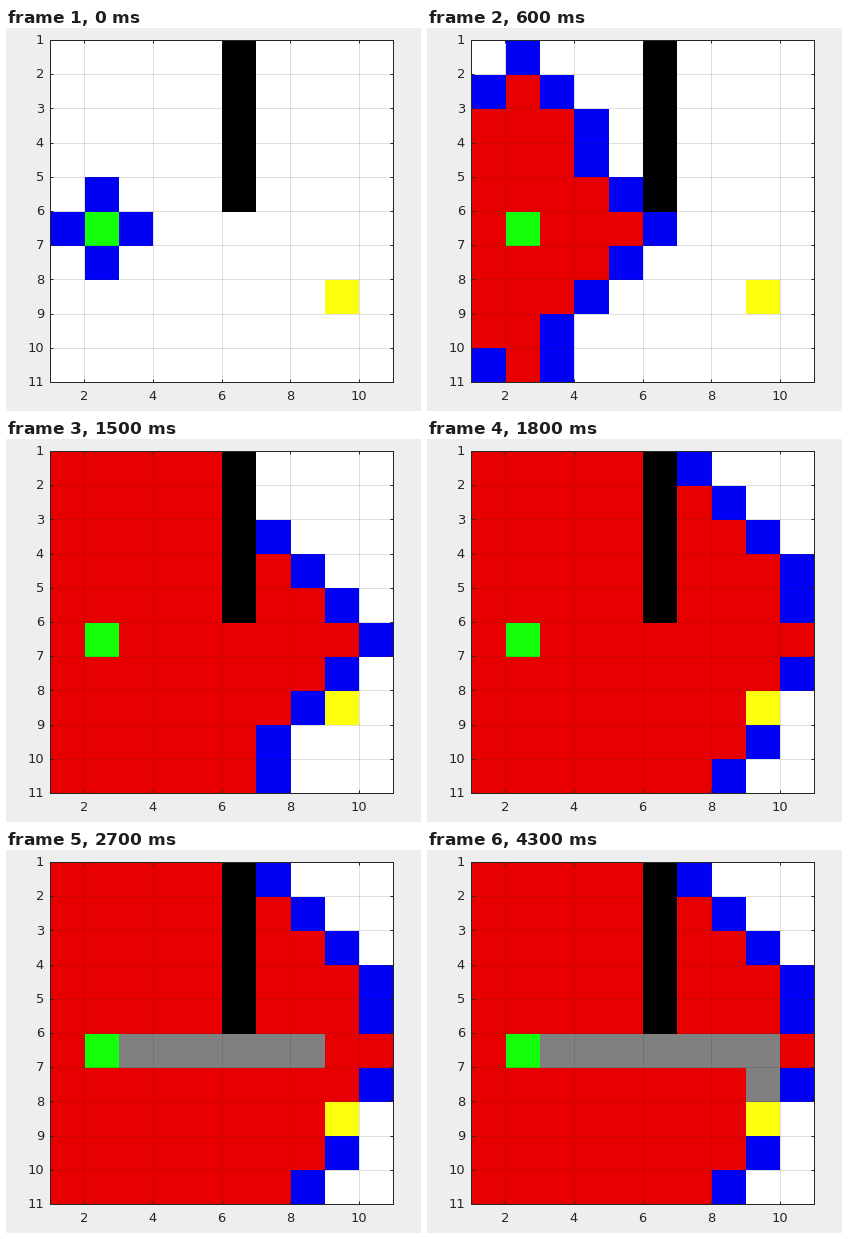
A matplotlib script that plays this animation: 415x383 px, repeating every 4400 ms.

```python
import numpy as np
import matplotlib.pyplot as plt
from matplotlib.animation import FuncAnimation
from matplotlib.colors import ListedColormap

W, H, DPI = 415, 383, 100
LEFT, RIGHT, TOP, BOTTOM = 44.05, 387.05, 12.05, 354.05
INK = "#262626"

FRAMES, INTERVAL = 44, 100
EXPANSIONS_PER_FRAME = 4.2
PATH_START, PATH_STEP = 2000, 140  # ms

N = 10
START, GOAL = (5, 1), (7, 8)  # (row, column), zero based
FREE, WALL, CLOSED, OPEN, BEGIN, END, PATH = range(7)
COLORS = ["#ffffff", "#000000", "#e80000", "#0000f5",
          "#14ff0a", "#fbff0c", "#808080"]


def make_grid():
    grid = np.full((N, N), FREE)
    grid[:5, 5] = WALL
    grid[START], grid[GOAL] = BEGIN, END
    return grid


def neighbours(cell):
    row, col = cell
    for r, c in ((row - 1, col), (row + 1, col), (row, col - 1), (row, col + 1)):
        if 0 <= r < N and 0 <= c < N:
            yield r, c


def search():
    """Dijkstra with ties broken column by column; returns snapshots and route."""
    grid = make_grid()
    dist, parent, done = {START: 0}, {}, set()
    snapshots = []
    while True:
        cell = min((c for c in dist if c not in done),
                   key=lambda c: (dist[c], c[1], c[0]))
        if cell == GOAL:
            break
        done.add(cell)
        if cell != START:
            grid[cell] = CLOSED
        for nxt in neighbours(cell):
            if grid[nxt] == WALL or nxt in done:
                continue
            if dist[cell] + 1 <= dist.get(nxt, N * N):
                dist[nxt] = dist[cell] + 1
                parent[nxt] = cell
                if nxt != GOAL:
                    grid[nxt] = OPEN
        snapshots.append(grid.copy())

    route, cell = [], parent[GOAL]
    while cell != START:
        route.append(cell)
        cell = parent[cell]
    return snapshots, route[::-1]


snapshots, route = search()


def state(frame):
    step = int(frame * EXPANSIONS_PER_FRAME + 1e-6)
    grid = snapshots[min(step, len(snapshots) - 1)].copy()
    shown = max(0, (frame * INTERVAL - PATH_START) // PATH_STEP + 1)
    for cell in route[:shown]:
        grid[cell] = PATH
    return grid


fig = plt.figure(figsize=(W / DPI, H / DPI), dpi=DPI, facecolor="#eeeeee")
ax = fig.add_axes([LEFT / W, 1 - BOTTOM / H,
                   (RIGHT - LEFT) / W, (BOTTOM - TOP) / H])

# Cell edges run through the middle of the one pixel wide grid lines.
cell_w, cell_h = (RIGHT - LEFT) / N, (BOTTOM - TOP) / N
edges = np.arange(1, N + 2)
mesh = ax.pcolormesh(edges + 0.5 / cell_w, edges + 0.5 / cell_h, state(0),
                     cmap=ListedColormap(COLORS), vmin=-0.5, vmax=6.5,
                     antialiased=False, linewidth=0, zorder=0)
ax.set_xlim(1, N + 1)
ax.set_ylim(N + 1, 1)

px = 72 / DPI
ax.set_xticks(range(2, 11, 2))
ax.set_yticks(range(1, 12))
ax.tick_params(direction="in", length=3.4 * px, width=px, color=INK,
               top=True, right=True, labelbottom=False, labelleft=False)
ax.set_axisbelow(False)
ax.grid(color=INK, alpha=0.15, linewidth=px)
for spine in ax.spines.values():
    spine.set(color=INK, linewidth=px)


def label(x, y, value, ha):
    fig.text(x / W, 1 - y / H, str(value), ha=ha, va="baseline",
             family="DejaVu Sans", size=13 * px, color=INK)


for v in range(2, 11, 2):
    label(LEFT + (v - 1) * cell_w, 372, v, "center")
for v in range(1, 12):
    label(38, TOP + (v - 1) * cell_h + 4.2, v, "right")


def update(frame):
    mesh.set_array(state(frame))
    return [mesh]


anim = FuncAnimation(fig, update, frames=FRAMES, interval=INTERVAL,
                     repeat=True, repeat_delay=0)
plt.show()
```
